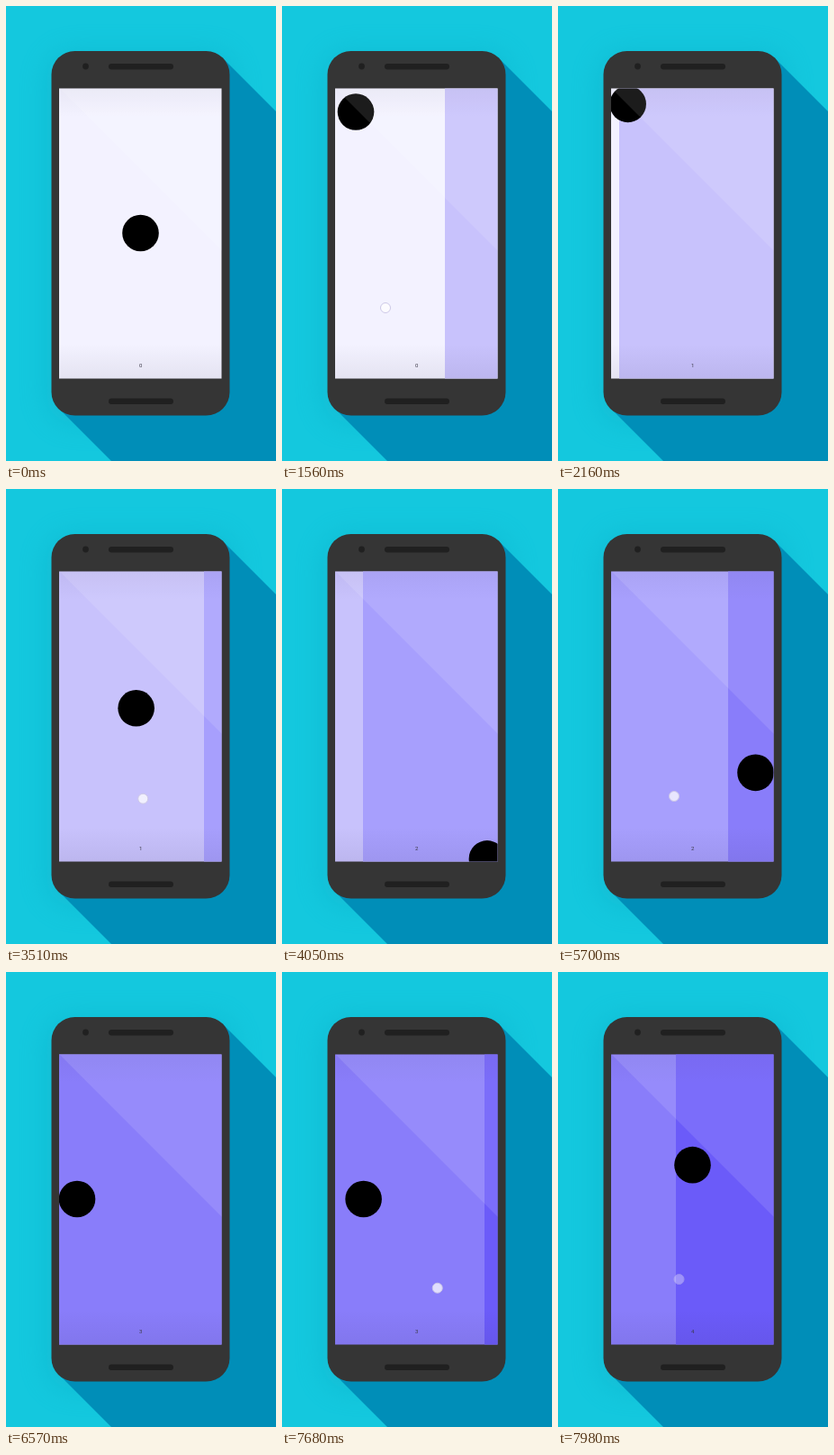
These frames come from a looping animation (300 by 505 pixels, 8000 ms). An HTML page:

```html
<!DOCTYPE html>
<html lang="en">
<head>
<meta charset="utf-8">
<title>Pager ball</title>
<style>
  html, body { margin: 0; width: 100%; height: 100%; overflow: hidden; background: #14c8de; }
  svg { display: block; width: 100%; height: 100%; }
</style>
</head>
<body>
<svg viewBox="0 0 300 505">
  <defs>
    <clipPath id="screen"><rect x="59" y="91.5" width="180.5" height="322"/></clipPath>
    <linearGradient id="shade" x2="0" y2="1">
      <stop offset="0" stop-color="#201838" stop-opacity=".05"/>
      <stop offset=".1" stop-color="#201838" stop-opacity="0"/>
      <stop offset=".88" stop-color="#201838" stop-opacity="0"/>
      <stop offset="1" stop-color="#201838" stop-opacity=".07"/>
    </linearGradient>
    <filter id="soft" x="-40%" y="-30%" width="180%" height="160%"><feGaussianBlur stdDeviation="16"/></filter>
  </defs>
  <rect width="300" height="505" fill="#14c8de"/>
  <rect x="46" y="52" width="207" height="410" rx="27" fill="#0a9cb8" opacity=".3" filter="url(#soft)"/>
  <path d="M240 57L300 117V505H117L58 446Z" fill="#008eb8"/>
  <rect x="50.5" y="50" width="198" height="404.5" rx="26" fill="#353535"/>
  <g fill="#202020">
    <circle cx="88.5" cy="67" r="3.4"/>
    <rect x="114" y="64" width="72" height="6.4" rx="3.2"/>
    <rect x="114" y="435.6" width="72" height="6.4" rx="3.2"/>
  </g>
  <g clip-path="url(#screen)">
    <rect id="page" x="59" y="91" width="181" height="323"/>
    <rect id="next" y="91" width="181" height="323"/>
    <rect x="59" y="91" width="181" height="323" fill="url(#shade)"/>
    <text id="label" x="149.6" y="401.4" text-anchor="middle" font-family="Roboto, sans-serif" font-size="6" fill="#3c3a48"></text>
    <circle id="ball" r="20.3"/>
    <path d="M59 91H240V272Z" fill="#fff" opacity=".11"/>
    <circle id="touch" r="5.5" fill="#fff" fill-opacity=".75" stroke="#cdc8e6" stroke-width="1"/>
  </g>
</svg>
<script>
const LOOP = 8000;
const COLORS = ['#f3f2ff', '#c8c2fc', '#a79ffd', '#897dfa', '#6b5bf9'];
const RESTS = [[149.5, 252], [79, 111.5], [219.5, 393.5], [79, 252]];

// down: finger lands, drag: it moves, fling: it lifts, held: page share at that moment
const SWIPES = [
  { down: 960, drag: 1200, fling: 1560, dur: 1500, held: .32, from: [188, 352], to: [115, 335] },
  { down: 3090, drag: 3090, fling: 3640, dur: 1500, held: .16, from: [188, 352], to: [136, 340] },
  { down: 5280, drag: 5280, fling: 5700, dur: 620, held: .272, from: [191, 355], to: [129, 341] },
  { down: 7350, drag: 7500, fling: 7900, dur: 684, held: .25, from: [191.5, 355.5], to: [134.5, 341] }
];

const el = id => document.getElementById(id);
const [page, next, label, ball, touch] = ['page', 'next', 'label', 'ball', 'touch'].map(el);
const clamp = v => Math.max(0, Math.min(1, v));
const mix = (a, b, k) => a + (b - a) * k;
const mix2 = (a, b, k) => [mix(a[0], b[0], k), mix(a[1], b[1], k)];
const set = (node, attrs) => { for (const k in attrs) node.setAttribute(k, attrs[k]); };

const pull = (s, t) => clamp((t - s.drag) / (s.fling - s.drag)) ** 1.4;

function scroll(s, t) {
  if (t < s.fling) return s.held * pull(s, t);
  return 1 - (1 - s.held) * (1 - clamp((t - s.fling) / s.dur)) ** 5;
}

// leaves fast, swings past the goal, then settles back
function swing(f) {
  const v = 1 - f;
  return 1 + .36 * v - 1.36 * v ** 4;
}

function ballAt(i, f, t) {
  const first = clamp(f * 2);
  if (i < 2) return mix2(RESTS[i], RESTS[i + 1], swing(f));
  if (i === 2) {
    const slide = 1 - (1 - clamp((t - 5745) / 825)) ** 3;
    return [mix(219.5, 79, slide), mix(393.5, 252, first)];
  }
  return [mix(79, 149.5, first), 252 - 188 * Math.max(0, f * 2 - 1)];
}

function draw(t) {
  let i = 0;
  while (i < 3 && t >= SWIPES[i + 1].down) i++;
  const s = SWIPES[i];
  const f = scroll(s, t);
  const [bx, by] = ballAt(i, f, t);
  const [tx, ty] = mix2(s.from, s.to, pull(s, t));

  set(page, { fill: COLORS[i] });
  set(next, { fill: COLORS[i + 1], x: Math.round(59 + 180.5 * (1 - f)) });
  set(ball, { cx: bx, cy: by });
  set(touch, { cx: tx, cy: ty, opacity: t < s.down ? 0 : 1 - clamp((t - s.fling) / 150) });
  label.textContent = f > .5 ? i + 1 : i;
}

function tick() {
  draw(performance.now() % LOOP);
  requestAnimationFrame(tick);
}
tick();
</script>
</body>
</html>
```
